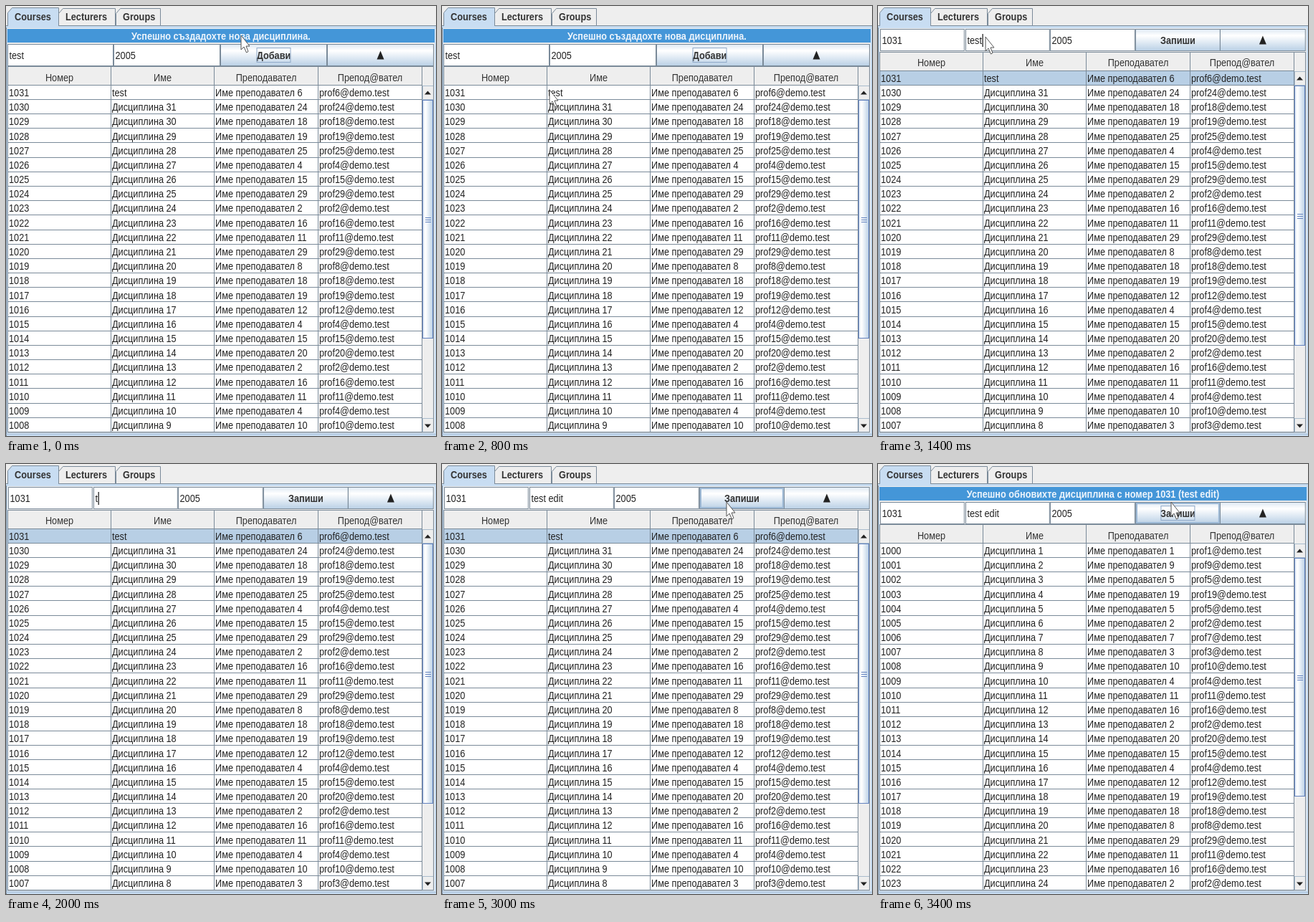
These frames come from a looping animation (600 px wide and 600 px high, 3600 ms). An HTML page with a canvas:

```html
<!DOCTYPE html>
<html lang="bg">
<head>
<meta charset="utf-8">
<style>
html, body { margin: 0; width: 100%; height: 100%; overflow: hidden; background: #eee }
canvas { display: block }
</style>
</head>
<body>
<canvas id="stage" width="600" height="600"></canvas>
<script>
const ctx = document.getElementById('stage').getContext('2d');
const STEP = 200, LOOP = 3600, PITCH = 20.17, BOTTOM = 594.9;
const LINE = '#7a8a99', PANEL = '#eeeeee', TAB = '#c8ddf2', SELECTED = '#b8cfe5', ACCENT = '#6382bf';
const COLUMNS = [2.5, 146.5, 290.5, 435.5, 580.5];
const HEADERS = ['Номер', 'Име', 'Преподавател', 'Препод@вател'];

// Lecturer of each course, from number 1000 upwards
const lecturers = [1, 9, 5, 19, 5, 2, 7, 3, 10, 4, 11, 16, 2, 20, 15, 4, 12, 19, 18, 8, 29, 11,
  16, 2, 29, 15, 4, 25, 19, 18, 24, 6];
const ascending = lecturers.map((who, i) => [
  String(1000 + i),
  i === 31 ? 'test' : 'Дисциплина ' + (i + 1),
  'Име преподавател ' + who,
  `prof${who}@demo.test`
]);
const descending = [...ascending].reverse();

// Pointer tip by step; it is hidden while typing
const pointer = {
  0: [328, 41], 1: [210, 272], 2: [205, 317], 3: [172, 205], 4: [150, 117], 5: [189, 117],
  6: [165, 68], 7: [150, 43], 14: [330, 70], 15: [397, 53], 16: [405, 53], 17: [409, 53]
};
const typed = { 8: '', 9: '', 10: 't', 11: 'tes', 12: 'test e', 13: 'test edi' };

function rect(x, y, w, h, fill) {
  ctx.fillStyle = fill;
  ctx.fillRect(x, y, w, h);
}

function box(x, y, w, h, stroke = LINE, fill) {
  if (fill) rect(x, y, w, h, fill);
  ctx.strokeStyle = stroke;
  ctx.strokeRect(x, y, w, h);
}

function shape(points, fill, stroke) {
  ctx.beginPath();
  points.forEach(([x, y]) => ctx.lineTo(x, y));
  ctx.closePath();
  if (fill) { ctx.fillStyle = fill; ctx.fill(); }
  if (stroke) { ctx.strokeStyle = stroke; ctx.stroke(); }
}

// The interface is shown taller than wide, so all text shares one scale
function text(string, x, y, { bold = false, align = 'left', color = '#222' } = {}) {
  ctx.save();
  ctx.setTransform(1.06, 0, 0, 1.26, x, y);
  ctx.font = `${bold ? 'bold ' : ''}12px "Liberation Sans", Arial, sans-serif`;
  ctx.textAlign = align;
  ctx.fillStyle = color;
  ctx.fillText(string, 0, 0);
  ctx.restore();
}

function shine(x0, y0, x1, y1) {
  const g = ctx.createLinearGradient(x0, y0, x1, y1);
  g.addColorStop(0, '#dde8f3');
  g.addColorStop(0.3, '#ffffff');
  g.addColorStop(0.55, '#e6eef6');
  g.addColorStop(1, SELECTED);
  return g;
}

function triangle(x, y, w, h) {
  shape([[x - w / 2, y + h / 2], [x, y - h / 2], [x + w / 2, y + h / 2]], '#222');
}

function tab(name, x, right, active) {
  const top = active ? 2.5 : 3.5;
  shape([[x, 27.5], [x, top + 7], [x + 6, top], [right, top], [right, 27.5]], active ? TAB : PANEL, LINE);
  if (active) rect(x + 0.5, 26, right - x - 1, 4, TAB);
  text(name, x + 9.5, 20, { bold: true, color: '#333' });
}

function frame() {
  rect(0, 0, 600, 600, PANEL);
  rect(0, 28, 600, 572, TAB);
  rect(0, 27, 600, 1, LINE);
  tab('Courses', 2.5, 73.5, true);
  tab('Lecturers', 73.5, 152.5);
  tab('Groups', 153.5, 215.5);
  rect(2, 31, 596, 565, PANEL);
  rect(0, 30, 1, 570, LINE);
  rect(0, 597, 600, 1, '#a9bfd6');
}

function field(string, x, y, w, caret) {
  box(x + 0.5, y + 0.5, w - 2, 30, LINE, '#fff');
  text(string, x + 2.5, y + 21);
  if (caret) {
    ctx.font = '12px "Liberation Sans", Arial, sans-serif';
    rect(x + 3 + ctx.measureText(string).width * 1.06, y + 7, 1.3, 18, '#222');
  }
}

function button(name, x, y, w, { focus, hover } = {}) {
  box(x + 0.5, y + 0.5, w - 1, 30, LINE, shine(0, y, 0, y + 31));
  if (hover) {
    ctx.lineWidth = 2;
    box(x + 2, y + 2, w - 4, 27, '#9db9d6');
    ctx.lineWidth = 1;
  }
  const middle = x + w / 2;
  if (!name) return triangle(middle, y + 15.5, 10, 12);
  text(name, middle, y + 21, { bold: true, align: 'center', color: '#333' });
  if (focus) box(middle - 23.5, y + 5.5, 47, 20, '#8fa9c8');
}

function scrollbar(top, thumbEnd) {
  rect(581, top, 16, BOTTOM - top, PANEL);
  box(581.5, top + 0.5, 15, 19, '#a9bccd', PANEL);
  triangle(588.5, top + 10, 9, 5);
  box(581.5, 575.5, 15, 19, '#a9bccd', PANEL);
  triangle(588.5, 586, 9, -5);
  const start = top + 20.5;
  box(581.5, start, 14, thumbEnd - start, ACCENT, shine(581, 0, 596, 0));
  const middle = Math.round((start + thumbEnd) / 2);
  for (let y = middle - 3; y <= middle + 3; y += 3) rect(585, y, 8, 1, ACCENT);
}

function table(rows, count, { selected, cellFocus } = {}) {
  const top = BOTTOM - count * PITCH;
  const headTop = Math.round(top - 25.5);
  rect(2, headTop, 579, 26, PANEL);
  rect(2, top, 579, BOTTOM - top, '#fff');
  if (selected) rect(3, top, 578, PITCH, SELECTED);
  for (let r = 0; r < count; r++) {
    const y = top + r * PITCH;
    rows[r].forEach((cell, c) => text(cell, COLUMNS[c] + 1.5, y + 15.3));
    rect(2, Math.round(y + PITCH) - 1, 579, 1, LINE);
  }
  HEADERS.forEach((name, c) =>
    text(name, (COLUMNS[c] + COLUMNS[c + 1]) / 2, top - 6.3, { align: 'center', color: '#333' }));
  rect(2, Math.round(top) - 1, 579, 1, LINE);
  COLUMNS.forEach(x => rect(x - 0.5, headTop, 1, BOTTOM - headTop, LINE));
  if (cellFocus) box(147.5, Math.round(top) + 0.5, 142, 18, ACCENT);
  scrollbar(Math.round(top), count === 24 ? 463.5 : 473.5);
  box(2.5, headTop - 0.5, 594, BOTTOM - headTop + 0.5);
}

function status(message) {
  rect(2, 32, 596, 19, '#4496d8');
  text(message, 300, 47, { bold: true, align: 'center', color: '#eef5fc' });
}

function arrow([x, y], alpha = 1) {
  ctx.save();
  ctx.globalAlpha = alpha;
  ctx.translate(x, y);
  shape([[0, 0], [0, 20], [4, 16], [7.5, 24], [10, 22.5], [7, 15], [12, 15]], '#fff', '#555');
  ctx.restore();
}

function editForm(step, y) {
  const w = 118.8;
  const name = step >= 14 ? 'test edit' : typed[step] ?? 'test';
  field('1031', 3, y, w);
  field(name, 122, y, w, step >= 7 && step <= 13);
  field('2005', 240, y, w + 1);
  button('Запиши', 359, y, w, { focus: step >= 16, hover: step >= 15 });
  button('', 477, y, w + 1);
}

function draw(step) {
  frame();
  if (step < 5) {
    status('Успешно създадохте нова дисциплина.');
    field('test', 2, 53, 149);
    field('2005', 150, 53, 150);
    button('Добави', 299, 53, 149, { focus: true });
    button('', 448, 53, 149);
    table(descending, 24);
  } else if (step < 16) {
    editForm(step, 32);
    table(descending, 25, { selected: true, cellFocus: step < 7 });
  } else {
    status('Успешно обновихте дисциплина с номер 1031 (test edit)');
    editForm(step, 53);
    table(ascending, 24);
  }
  if (step === 2) arrow(pointer[1], 0.3);
  if (pointer[step]) arrow(pointer[step], step === 5 ? 0.6 : 1);
}

function tick() {
  draw(Math.floor(performance.now() % LOOP / STEP));
  requestAnimationFrame(tick);
}
tick();
</script>
</body>
</html>
```
